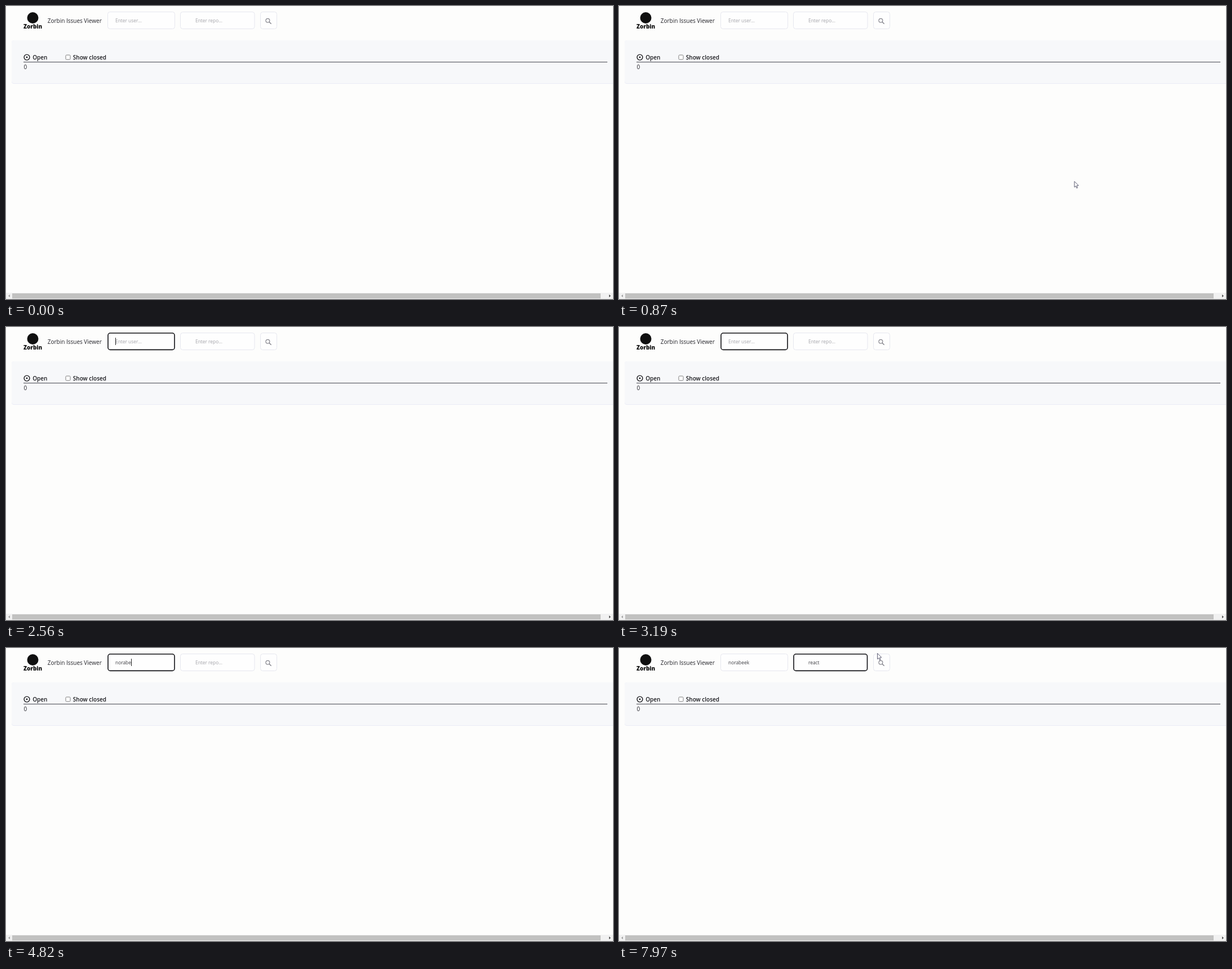
Write an HTML page with a canvas that moves like this. It is 1077 px wide and 520 px high and loops after 8 s.

```html
<!DOCTYPE html>
<html lang="en">
<head>
<meta charset="utf-8">
<title>Issues Viewer</title>
<style>
html, body { margin: 0; width: 100%; height: 100%; overflow: hidden; background: #fdfdfc; }
canvas { display: block; width: 1077px; height: 520px; }
</style>
</head>
<body>
<canvas id="stage"></canvas>
<script>
const W = 1077, H = 520, LOOP = 8000, BLINK = 530;
const FONT = '"Open Sans", "Noto Sans", sans-serif';
const canvas = document.getElementById('stage');
const ctx = canvas.getContext('2d');
const dpr = window.devicePixelRatio || 1;
canvas.width = W * dpr;
canvas.height = H * dpr;

const fields = [
  { x: 180, w: 120, textX: 194, hint: 'Enter user...', value: 'norabeek',
    focus: 2400, blur: 5550, keys: [3800, 3990, 4180, 4370, 4560, 4750, 4940, 5130] },
  { x: 309, w: 132.5, textX: 336, hint: 'Enter repo...', value: 'react',
    focus: 5550, blur: LOOP, keys: [6050, 6300, 6500, 6720, 6950] }
];

// Pointer paths as [time, x, y]; over a text field the arrow is hidden.
const paths = [
  [[480, 1077, 490], [870, 808, 311], [1250, 640, 230], [1660, 330, 96], [1940, 272, 40], [1990, 270, 37]],
  [[7840, 442, 15], [7970, 458, 9], [8000, 459, 8]]
];

function text(str, x, y, size, color = '#24242a', weight = 400, align = 'left') {
  ctx.font = `${weight} ${size}px ${FONT}`;
  ctx.fillStyle = color;
  ctx.textAlign = align;
  ctx.fillText(str, x, y);
}

function rect(x, y, w, h, color) {
  ctx.fillStyle = color;
  ctx.fillRect(x, y, w, h);
}

function box(x, y, w, h, r, stroke, width = 1, fill) {
  ctx.beginPath();
  ctx.roundRect(x, y, w, h, r);
  if (fill) { ctx.fillStyle = fill; ctx.fill(); }
  if (stroke) { ctx.strokeStyle = stroke; ctx.lineWidth = width; ctx.stroke(); }
}

function circle(x, y, r, fill, stroke, width) {
  ctx.beginPath();
  ctx.arc(x, y, r, 0, Math.PI * 2);
  if (fill) { ctx.fillStyle = fill; ctx.fill(); }
  if (stroke) { ctx.strokeStyle = stroke; ctx.lineWidth = width; ctx.stroke(); }
}

function polygon(points, fill) {
  ctx.beginPath();
  points.forEach(([x, y]) => ctx.lineTo(x, y));
  ctx.closePath();
  ctx.fillStyle = fill;
  ctx.fill();
}

function drawField(f, t) {
  const focused = t >= f.focus && t < f.blur;
  if (focused) box(f.x + 1, 10.8, f.w - 2, 29.6, 4, '#101014', 1.6, '#fefefe');
  else box(f.x + 0.5, 10.5, f.w - 1, 30, 4, '#e6e7ef', 1, '#fefefe');

  const count = f.keys.filter(k => k <= t).length;
  const typed = f.value.slice(0, count);
  if (count) text(typed, f.textX, 29, 8.4, '#3c3c42');
  else text(f.hint, f.textX, 29, 8.4, '#a3a3a9');

  const since = t - (count ? f.keys[count - 1] : f.focus);
  if (focused && Math.floor(since / BLINK) % 2 === 0) {
    ctx.font = `400 8.4px ${FONT}`;
    rect(Math.round(f.textX + ctx.measureText(typed).width), 19, 1, 13, '#222');
  }
}

function drawHeader(t) {
  circle(47.5, 21, 10, '#101010');
  text('Zorbin', 47.5, 39.6, 9.9, '#101010', 800, 'center');
  text('Zorbin Issues Viewer', 73.7, 29.7, 10);
  fields.forEach(f => drawField(f, t));

  box(451.5, 10.5, 29, 30, 4, '#e6e7ef', 1, '#fefefe');
  circle(464.4, 25.7, 3.4, null, '#83838b', 1.2);
  ctx.beginPath();
  ctx.moveTo(467, 28.3);
  ctx.lineTo(470.6, 31.8);
  ctx.lineWidth = 1.5;
  ctx.stroke();
}

function drawPanel() {
  box(10, 61, W, 77, 4, null, 0, '#e9ebf6');
  box(10, 61, W, 76, 4, null, 0, '#f7f8fa');
  circle(37, 91, 4.9, null, '#18181c', 1.4);
  circle(37, 91, 1.4, '#18181c');
  text('Open', 47.2, 94.8, 10, '#18181c', 600);
  box(106, 87, 8, 8, 1.5, '#7c7c7c', 1, '#fff');
  text('Show closed', 118.8, 94.8, 10, '#18181c', 600);
  rect(31, 99, 1036, 1, '#45464e');
  text('0', 31.4, 111.5, 10);
}

function drawScrollbar() {
  rect(0, 509, W, 11, '#f1f1f1');
  rect(11, 510, 1044, 9, '#c1c1c0');
  polygon([[7, 512], [7, 517], [4, 514.5]], '#a0a0a0');
  polygon([[1070, 512], [1070, 517], [1073, 514.5]], '#505050');
}

function drawPointer(t) {
  for (const path of paths) {
    const i = path.findIndex(p => p[0] > t);
    if (i < 1) continue;
    const [t0, x0, y0] = path[i - 1], [t1, x1, y1] = path[i];
    const k = (t - t0) / (t1 - t0);
    ctx.save();
    ctx.translate(x0 + (x1 - x0) * k + 0.5, y0 + (y1 - y0) * k + 0.5);
    polygon([[0, 0], [0, 10.3], [2.4, 8.2], [4, 12], [5.6, 11.3], [4.1, 7.6], [7.3, 7.3]], '#fff');
    ctx.lineJoin = 'round';
    ctx.strokeStyle = '#4b4b62';
    ctx.lineWidth = 0.9;
    ctx.stroke();
    ctx.restore();
  }
}

function draw(t) {
  ctx.setTransform(dpr, 0, 0, dpr, 0, 0);
  rect(0, 0, W, H, '#fdfdfc');
  drawHeader(t);
  drawPanel();
  drawScrollbar();
  drawPointer(t);
}

const start = performance.now();
function tick() {
  draw((performance.now() - start) % LOOP);
  requestAnimationFrame(tick);
}
tick();
</script>
</body>
</html>
```
